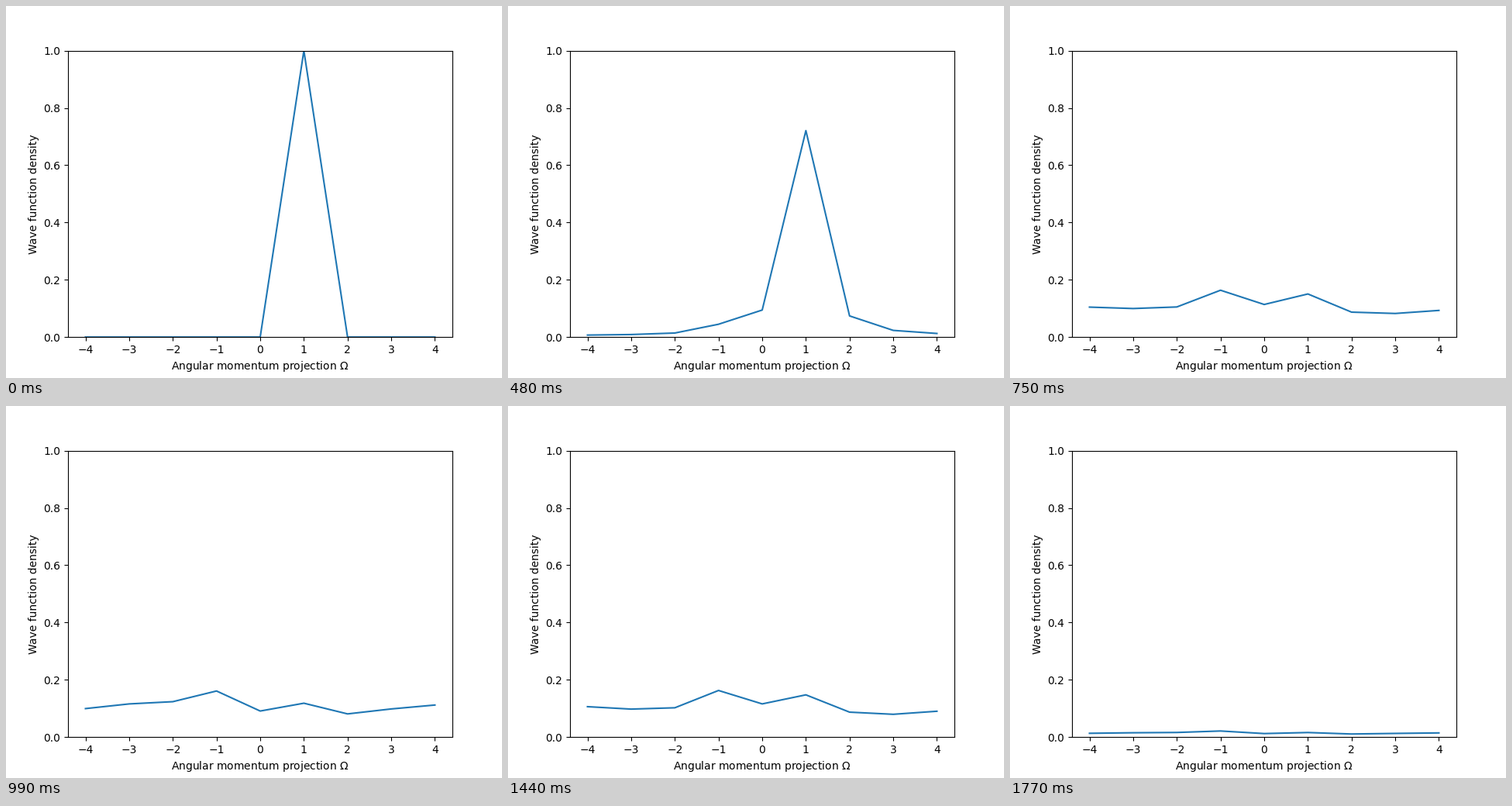
A matplotlib script that plays this animation: 640x480 px, repeating every 1.8 s.

```python
import numpy as np
import matplotlib.pyplot as plt
from matplotlib.animation import FuncAnimation

FRAMES, INTERVAL = 60, 30
START = 1
omega = np.arange(-4, 5)
distance = np.abs(omega - START)
away = distance > 0

# Mean density per state once the wave has spread out.
mean = np.array([.104, .106, .112, .163, .106, .136, .085, .088, .100])


def sigmoid(x):
    return 1 / (1 + np.exp(-x))


def spread_density(step):
    """Mean density with a standing wave on top."""
    swing = np.cos(2 * np.pi * (step - 33) / 24)
    p = mean - 0.016 * swing * np.cos(np.pi / 3 * omega - 0.65)
    return p / p.sum()


def wave(step):
    # States fill up later the farther they lie from the start.
    delay = 21 - 7.4 / distance[away]
    p = np.empty(len(omega))
    p[away] = spread_density(step)[away] * sigmoid(0.75 * (step - delay))
    p[~away] = 1 - p[away].sum()
    # The total probability is lost near the end.
    return p * sigmoid(0.58 * (55.75 - step))


fig, ax = plt.subplots(figsize=(6.4, 4.8), dpi=100)
line, = ax.plot(omega, wave(0))
ax.set_ylim(0, 1)
ax.set_xlabel(r"Angular momentum projection $\Omega$")
ax.set_ylabel("Wave function density")


def update(step):
    line.set_ydata(wave(step))
    return line,


anim = FuncAnimation(fig, update, frames=FRAMES, interval=INTERVAL,
                     repeat=True, repeat_delay=0)
plt.show()
```
